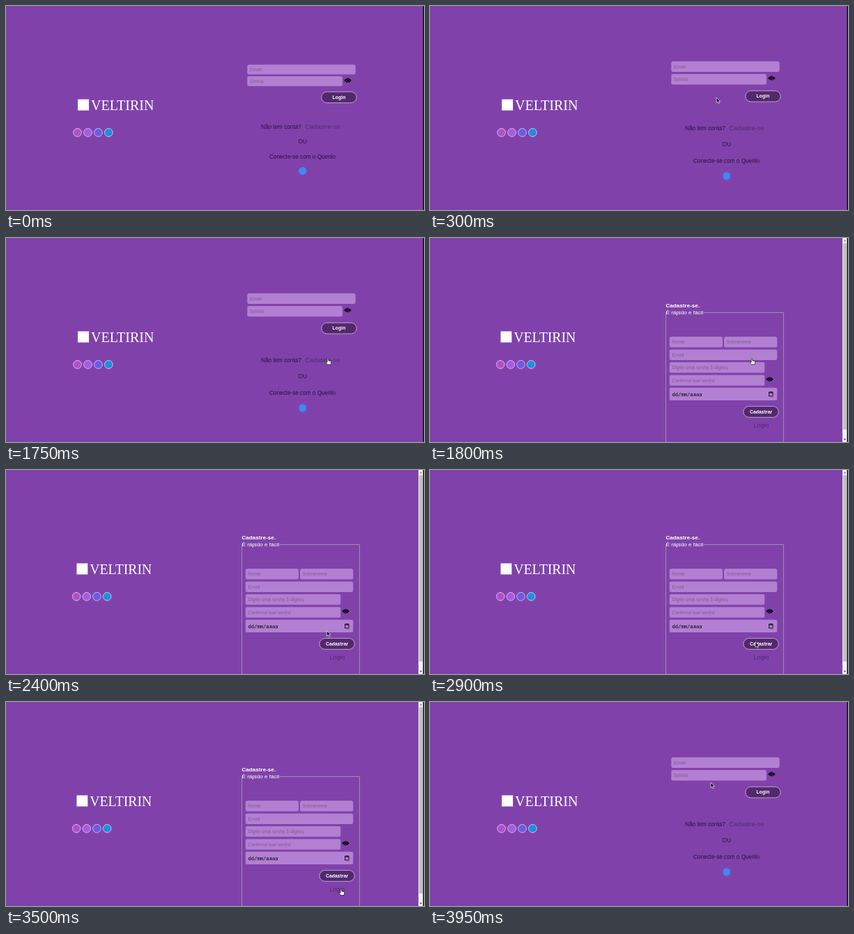
An HTML page for the animation above (4000 ms loop, 600x294 px).

```html
<!DOCTYPE html>
<html lang="pt">
<head>
<meta charset="utf-8">
<style>
html, body { margin: 0; width: 100%; height: 100%; overflow: hidden; background: #8042aa; }
svg { display: block; width: 600px; height: 294px; }
text { font-family: "Liberation Sans", Arial, sans-serif; white-space: pre; }
</style>
</head>
<body>
<svg id="stage" viewBox="0 0 600 294"></svg>
<script>
const BG = '#8042aa', FIELD = '#b37fd2', HINT = '#7d6091', DARK = '#53296e', LINK = '#562975', INK = '#29113a';
const LOOP = 4000;

const text = (x, cy, size, fill, str, extra = '') =>
  `<text x="${x}" y="${cy + size * 0.35}" font-size="${size}" fill="${fill}" ${extra}>${str}</text>`;
const middle = 'text-anchor="middle"';
const bold = 'font-weight="bold"';

const field = (x, y, w, hint) =>
  `<rect class="field" x="${x}" y="${y}" width="${w}" height="15.2" rx="2.5" fill="${FIELD}"/>` +
  text(x + 3.8, y + 7.7, 6.8, HINT, hint);

const button = (x, y, label) =>
  `<rect x="${x}" y="${y}" width="50.4" height="15.8" rx="7.9" fill="${DARK}" stroke="#d3bce0" stroke-width=".8"/>` +
  text(x + 25.2, y + 7.8, 6.9, '#fff', label, `${middle} ${bold}`);

const eye = (x, y) => `<g transform="translate(${x} ${y})">
  <path d="M-5.4 0Q0-6.2 5.4 0Q0 6.2-5.4 0Z"/>
  <circle r="2" fill="${BG}"/><circle r="1.4"/></g>`;

const brand = () => {
  const dots = ['#b250c9', '#a75ae2', '#6b5ce6', '#1f8fe2'].map((c, i) =>
    `<circle cx="${102.6 + i * 14.9}" cy="182.3" r="5.9" fill="${c}" stroke="#d9c4e8" stroke-width=".9"/>`);
  return `<rect x="103" y="134.5" width="16" height="16" fill="#fff"/>
    <text x="122" y="150" font-size="20" fill="#fff" style="font-family:'Liberation Serif',serif">VELTIRIN</text>
    ${dots.join('')}`;
};

// Each row carries the shift it has before the page settles.
const loginRows = [
  [4.7, field(346.3, 79.7, 155.4, 'Email')],
  [3.2, field(346.3, 98, 136.7, 'Senha') + eye(490.5, 104)],
  [1.5, button(452.8, 122.2, 'Login')],
  [-2, text(366, 176, 8.2, INK, 'Não tem conta?')],
  [-2.2, text(429.3, 176, 9.2, LINK, 'Cadastre-se')],
  [-3.9, text(425.7, 198.7, 8.2, INK, 'OU', middle)],
  [-5.8, text(425.5, 222.8, 8.2, INK, 'Conecte-se com o Quenlo', middle)],
  [-7.2, '<circle cx="425.7" cy="245" r="5.7" fill="#4285f4"/>'],
];
const login = () => brand() +
  loginRows.map(([dy, row]) => `<g class="row" data-dy="${dy}">${row}</g>`).join('');

const scrollbar = () => `<rect x="592" width="7" height="294" fill="#f1f1f1"/>
  <rect x="592.8" y="7.5" width="5.4" height="268.5" fill="#c1c1c1"/>
  <path d="M593.8 4.8L595.5 2.6L597.2 4.8Z" fill="#777"/>
  <path d="M593.8 289.2L595.5 291.4L597.2 289.2Z" fill="#444"/>`;

const register = () => `<g transform="translate(-.2 0) scale(.987 1)">${brand()}</g>` +
  `<path d="M392.5 107.5H507.5V294M338.5 294V107.5" fill="none" stroke="#a590ae" stroke-width=".9"/>` +
  text(338.5, 97, 8.1, '#fff', 'Cadastre-se.', bold) +
  text(338.5, 107.3, 8.1, '#fff', 'É rápido e fácil') +
  field(343.8, 142.3, 76.2, 'Nome') + field(422, 142.3, 76.3, 'Sobrenome') +
  field(343.8, 160.7, 154.5, 'Email') +
  field(343.8, 179, 136.5, 'Digite uma senha 6 digitos') +
  field(343.8, 197.5, 136.5, 'Confirme sua senha') + eye(487.5, 203.5) +
  `<rect x="343.8" y="215.8" width="154.5" height="18.3" rx="2.5" fill="${FIELD}"/>` +
  text(347.4, 225.2, 7.2, '#000', 'dd/mm/aaaa', `style="font-family:'DejaVu Sans Mono',monospace"`) +
  '<path d="M486.7 222.2H492V228H486.7ZM487.9 221V222M490.8 221V222M486.7 223H492" fill="none" stroke="#000" stroke-width=".9"/>' +
  button(449.9, 242.6, 'Cadastrar') +
  text(464.3, 270, 9, LINK, 'Login') + scrollbar();

const arrow = '<path transform="scale(.87)" d="M0 0V8.6L2 6.8L3.5 10L5 9.3L3.6 6.2H6.2Z" fill="#000" stroke="#fff" stroke-width=".8"/>';
const hand = '<path d="M-.9 .7Q0-.5 .9 .7V3.3L4 4Q5 4.3 4.8 5.5L4.1 9H-.5L-3 5.6Q-2.6 4.5-.9 5.8Z" fill="#fff" stroke="#111" stroke-width=".7"/>';

const stage = document.getElementById('stage');
stage.innerHTML = `<rect width="600" height="294" fill="${BG}"/>
  <g id="login">${login()}</g><g id="register">${register()}</g>
  <rect x="598.6" width="1.4" height="294" fill="#0b0710"/>
  <g id="cursor"><g id="arrow">${arrow}</g><g id="hand">${hand}</g></g>`;

const $ = id => document.getElementById(id);
const show = (id, on) => $(id).setAttribute('visibility', on ? 'inherit' : 'hidden');
const rows = [...document.querySelectorAll('.row')];
const loginFields = [...document.querySelectorAll('.row .field')];

// Pointer stops: time, x, y
const path = [
  [50, 403, 116], [850, 438, 184.2], [1150, 440, 182], [1600, 462, 173.5], [1900, 462, 173.5],
  [2400, 460.5, 231.8], [2700, 462, 240], [3300, 481, 269.5], [3550, 481, 269.5], [3900, 403, 116], [4000, 403, 116],
];
const pointer = t => {
  const i = Math.max(1, path.findIndex(p => p[0] >= t));
  const [a, b] = [path[i - 1], path[i]];
  const u = Math.max(0, (t - a[0]) / (b[0] - a[0]));
  const k = u * u * (3 - 2 * u);
  return [a[1] + (b[1] - a[1]) * k, a[2] + (b[2] - a[2]) * k];
};
const inside = (x, y, l, t, r, b) => x > l && x < r && y > t && y < b;

function draw(now) {
  const t = now % LOOP;
  const onRegister = t >= 1800 && t < 3550;
  const settled = t >= 50;
  const [x, y] = pointer(t);
  const overLink = onRegister
    ? t < 1950 || inside(x, y, 464, 264, 487, 276)
    : inside(x, y, 429, 170, 480, 182);
  show('login', !onRegister);
  show('register', onRegister);
  show('arrow', settled && !overLink);
  show('hand', settled && overLink);
  $('cursor').setAttribute('transform', `translate(${x} ${y})`);
  for (const r of rows) r.setAttribute('transform', `translate(0 ${settled ? 0 : r.dataset.dy})`);
  for (const f of loginFields) f.setAttribute('height', settled ? 15.2 : 14.2);
}

const start = performance.now();
const tick = () => {
  draw(performance.now() - start);
  requestAnimationFrame(tick);
};
tick();
</script>
</body>
</html>
```
